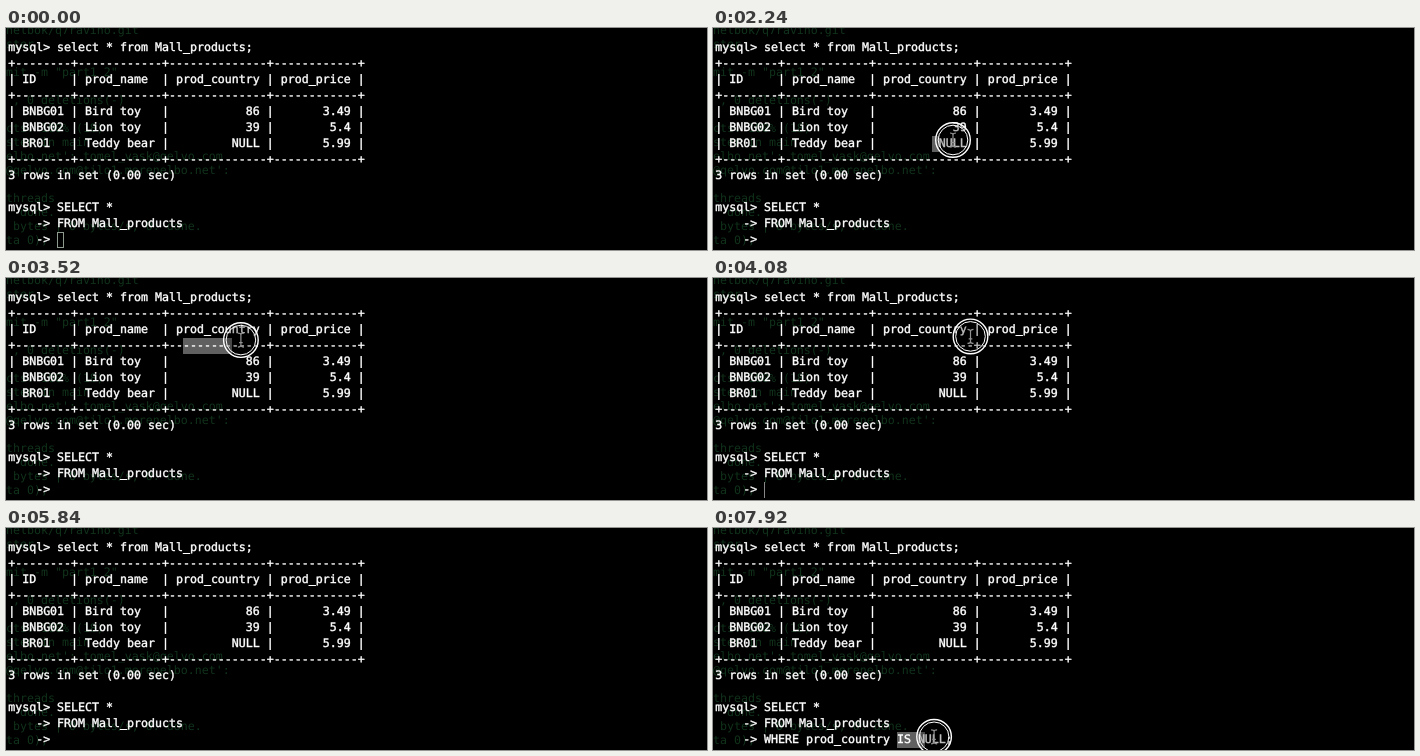
An HTML page for the animation above (8 s loop, 701x222 px).

```html
<!DOCTYPE html>
<html lang="en">
<head>
<meta charset="utf-8">
<title>Terminal query</title>
<style>
  html, body { margin: 0; width: 100%; height: 100%; overflow: hidden; background: #000; }
  svg { display: block; width: 701px; height: 222px; }
  text {
    font-family: "DejaVu Sans Mono", monospace;
    font-size: 11.627px;
    white-space: pre;
    text-rendering: geometricPrecision;
  }
  #ghost { fill: #10321a; }
  #lines { fill: #fff; stroke: #fff; stroke-width: .4; }
  #selection { fill: #606060; }
  #box { fill: none; stroke: #8f9a8f; }
  #bar { fill: #888; }
  #ring { fill: rgba(0, 0, 0, .25); stroke: #fff; }
  #beam { fill: none; stroke: #929292; stroke-width: 1.2; }
  #arrow { fill: #000; stroke: #ddd; stroke-width: 1.1; stroke-linejoin: round; }
</style>
</head>
<body>
<svg viewBox="0 0 701 222">
  <g id="ghost"></g>
  <g id="selection"></g>
  <g id="lines"></g>
  <rect id="box" x="51.5" y="204.5" width="6" height="15"/>
  <rect id="bar" y="204" width="1" height="16"/>
  <g id="pointer">
    <g id="ring">
      <circle r="17.3" stroke-width="1.4"/>
      <circle r="14.8" fill="none"/>
    </g>
    <path id="arrow" d="M-4.5-8V6.5L-1.2 3.4L1.3 9L3.9 7.8L1.5 2.4H6Z"/>
    <path id="beam" d="M-3-7Q0-7 0-5V5Q0 7-3 7M3-7Q0-7 0-5M0 5Q0 7 3 7M-1.8 2.5H1.8"/>
  </g>
</svg>
<script>
const LOOP = 8000, STEP = 80, BLINK = 720;
const LEFT = 2, TOP = 12, CELL = 7, ROW = 16, WIDTH = 701;
const FOCUS = 960, PASTE = 6160;
const PROMPT = "    -> ", CLAUSE = "WHERE prod_country IS NULL;";

const $ = id => document.getElementById(id);
const columnX = column => LEFT + CELL * column;
const rowY = row => TOP + ROW * row;
const show = (node, visible) => node.setAttribute("visibility", visible ? "visible" : "hidden");

function setAttrs(node, attrs) {
  for (const key in attrs) node.setAttribute(key, attrs[key]);
}

function add(parent, tag, attrs, content = "") {
  const node = document.createElementNS("http://www.w3.org/2000/svg", tag);
  setAttrs(node, attrs);
  node.textContent = content;
  return parent.appendChild(node);
}

function addLines(parent, x, y, pitch, lines) {
  return lines.map((line, i) => add(parent, "text", { x, y: y + pitch * i }, line));
}

const rule = "+" + [8, 12, 14, 12].map(n => "-".repeat(n)).join("+") + "+";
const tableRow = (id, name, country, price) =>
  `| ${id.padEnd(6)} | ${name.padEnd(10)} | ${country.padStart(12)} | ${price.padStart(10)} |`;

const prompt = addLines($("lines"), LEFT + .2, TOP + 11.4, ROW, [
  "mysql> select * from Mall_products;",
  rule,
  tableRow("ID", "prod_name", "prod_country", "prod_price"),
  rule,
  tableRow("BNBG01", "Bird toy", "86", "3.49"),
  tableRow("BNBG02", "Lion toy", "39", "5.4"),
  tableRow("BR01", "Teddy bear", "NULL", "5.99"),
  rule,
  "3 rows in set (0.00 sec)",
  "",
  "mysql> SELECT *",
  PROMPT + "FROM Mall_products",
  PROMPT
]).pop();

// Faint window showing through the translucent terminal
addLines($("ghost"), 0, 6, 14, [
  "nelbok/q7ravino.git",
  "ster",
  "",
  "mit -m \"part1 2\"",
  "",
  " , 0 deletions(-)",
  "",
  "cts: 100% (18)",
  "ster in main",
  "elbo.net': tomel_vask@qelvo.com",
  "@qelvo.com@tilo1.merenelbo.net':",
  "",
  "threads",
  "  done.",
  " bytes | 0 bytes/s, 0: done.",
  "ta 0),"
]);

const spans = [0, 1].map(() => add($("selection"), "rect", { height: ROW }));

// Pointer moves between places given in text columns and rows
const moves = [];
let place = { column: 55, row: 14 };
function move(start, end, column, row, drag = false) {
  const to = { column, row };
  moves.push({ start, end, from: place, to, drag });
  place = to;
}
move(160, 560, 27.7, 9.3);
move(1440, 2080, 31.7, 6.4);
move(2160, 2320, 36.3, 6.1, true);
move(2400, 2960, 25.2, 3.7);
move(3120, 3680, 36.5, 2.9, true);
move(4800, 5040, 6.9, 12.4);
move(5120, 5440, 8, 14.5);
move(6480, 6640, 27, 12.8);
move(6960, 7360, 26.2, 12.3);
move(7440, 7920, 31.3, 12.3, true);

const presses = [
  { start: 880, end: 1040 },
  { start: 4080, end: 4080 },
  ...moves.filter(m => m.drag).map(m => ({ ...m, start: m.start + STEP }))
].sort((a, b) => a.start - b.start);

const lastPress = t => presses.filter(p => p.start <= t).pop();

function pointerAt(t) {
  const { start, end, from, to } = moves.filter(m => m.start <= t).pop() || moves[0];
  const k = Math.max(0, Math.min(1, (t - start) / (end - start)));
  const mix = key => from[key] + (to[key] - from[key]) * k;
  return { column: mix("column"), row: mix("row") };
}

function ringOpacity(t) {
  const press = lastPress(t);
  return press ? Math.max(0, Math.min(1, 1 - (t - press.end) / (2 * STEP))) : 0;
}

// The selection trails the pointer by one step and wraps over whole rows
function selectionAt(t) {
  const press = lastPress(t);
  if (!press?.drag) return [];
  const head = pointerAt(Math.min(t - STEP, press.end));
  const row = Math.floor(head.row), anchorRow = Math.floor(press.from.row);
  const x = columnX(Math.round(head.column));
  const anchorX = columnX(Math.floor(press.from.column));
  return row < anchorRow
    ? [{ row, left: x, right: WIDTH }, { row: anchorRow, left: 0, right: anchorX }]
    : [{ row, left: anchorX, right: x }];
}

function barVisible(t) {
  if (t < FOCUS) return false;
  const phase = t < PASTE ? t - STEP : t - PASTE + BLINK + STEP;
  return Math.floor(phase / BLINK) % 2 === 1;
}

function draw(now) {
  const t = Math.floor((now % LOOP) / STEP) * STEP;
  const pasted = t >= PASTE;
  const { column, row } = pointerAt(t);
  const selection = selectionAt(t);

  spans.forEach((rect, i) => {
    const { row = 0, left = 0, right = 0 } = selection[i] || {};
    setAttrs(rect, { x: left, y: rowY(row), width: Math.max(0, right - left) });
  });

  const line = PROMPT + (pasted ? CLAUSE : "");
  if (prompt.textContent !== line) prompt.textContent = line;

  show($("box"), t < FOCUS);
  show($("bar"), barVisible(t) && !selection.length);
  setAttrs($("bar"), { x: columnX(line.length) });

  setAttrs($("pointer"), { transform: `translate(${columnX(column)} ${rowY(row)})` });
  setAttrs($("ring"), { opacity: ringOpacity(t) });
  show($("arrow"), t < 1200);
  show($("beam"), t >= 1200);
}

let start;
function tick(now) {
  start ??= now;
  draw(now - start);
  requestAnimationFrame(tick);
}
draw(0);
requestAnimationFrame(tick);
</script>
</body>
</html>
```
